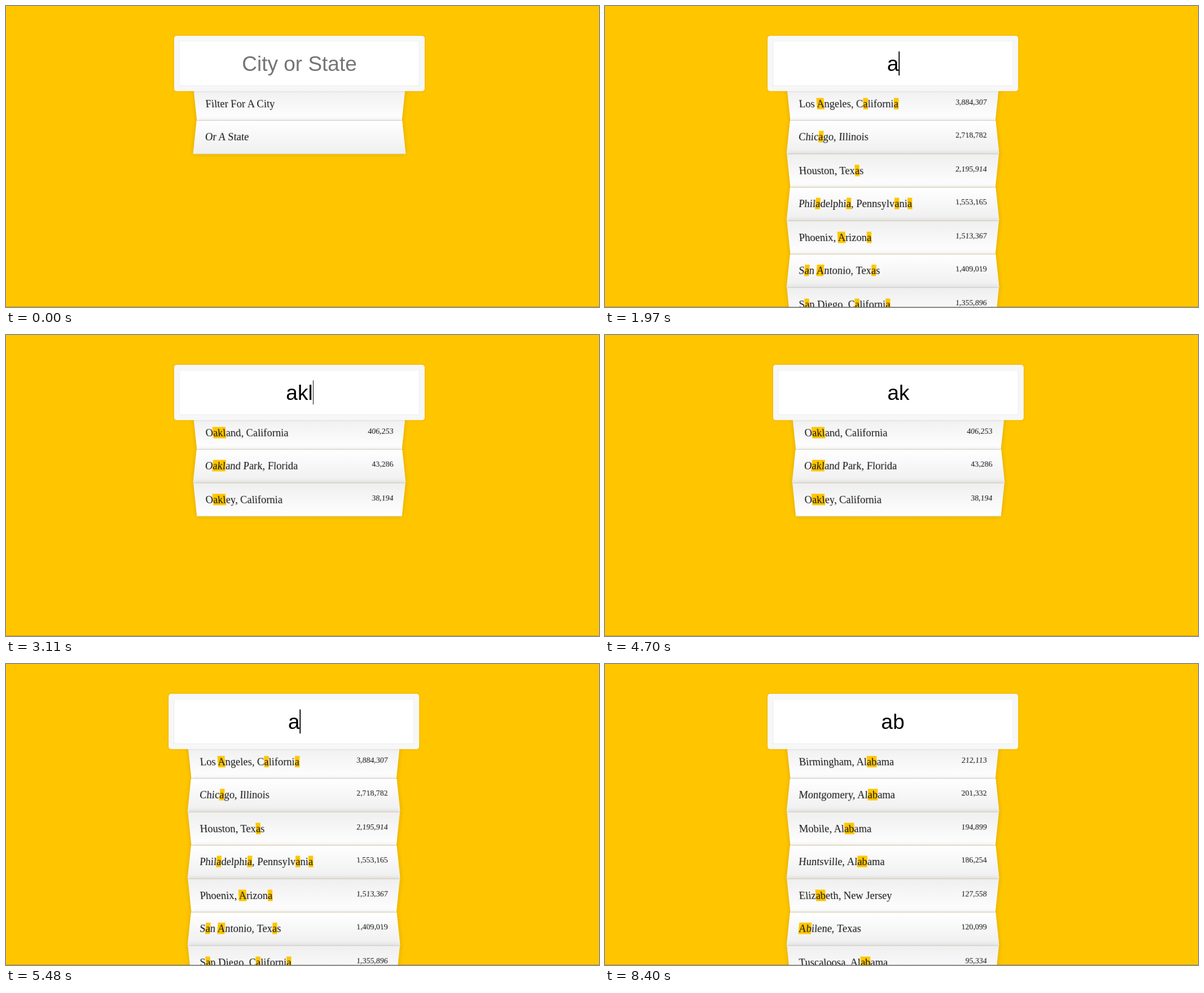
Animation, 1051 px wide and 533 px high, one loop 8600 ms. Source, as an HTML page:

```html
<!DOCTYPE html>
<html lang="en">
<head>
<meta charset="utf-8">
<title>City filter</title>
<style>
  * { box-sizing: border-box; }
  html, body { margin: 0; width: 100%; height: 100%; overflow: hidden; background: #ffc600; }
  #stage { position: relative; width: 1051px; height: 533px; overflow: hidden; background: #ffc600; }
  #stage::after {
    content: ""; position: absolute; left: 0; right: 0; bottom: 0; height: 1px;
    background: rgba(70, 50, 0, .28);
  }
  #form {
    position: absolute; left: 0; top: 0; width: 400px; height: 0;
    transform-origin: 0 0;
  }
  #field {
    position: absolute; z-index: 2; left: -40px; top: 57.3px; width: 480px; height: 106px;
    padding: 20px; border: 10px solid #f7f7f7; border-radius: 5px; background: #fff;
    box-shadow: 0 0 5px rgba(0, 0, 0, .12), inset 0 0 2px rgba(0, 0, 0, .19);
    font: 40px/46px "Liberation Sans", Arial, sans-serif;
    text-align: center; color: #000; white-space: pre;
  }
  #hint { position: absolute; left: 0; right: 0; top: 20px; color: #757575; }
  #typed { position: relative; display: inline-block; height: 46px; vertical-align: top; }
  #caret { position: absolute; left: 100%; top: 0; width: 1.6px; height: 46px; background: #000; }
  ul {
    position: absolute; left: 0; top: 153px; width: 400px; margin: 0; padding: 0;
    font: 20px/23px "Liberation Serif", "Times New Roman", serif; color: #111;
  }
  li {
    display: flex; justify-content: space-between; height: 64px; padding: 20px;
    list-style: none; white-space: pre; border-bottom: 1px solid #d8d8d8;
    box-shadow: 0 0 10px rgba(0, 0, 0, .14);
  }
  li:nth-child(odd) {
    transform: perspective(100px) rotateX(-3deg) translateY(3px);
    background: linear-gradient(to top, #fff, #efefef);
  }
  li:nth-child(even) {
    transform: perspective(100px) rotateX(3deg) translateY(2px) scale(1.001);
    background: linear-gradient(to bottom, #fff, #efefef);
  }
  .count { font-size: 15px; line-height: 17px; }
  mark { background: #ffc600; color: inherit; }
  #pointer { position: absolute; left: 0; top: 0; width: 24px; height: 36px; overflow: visible; }
</style>
</head>
<body>
<div id="stage">
  <div id="form">
    <div id="field"><span id="hint">City or State</span><span id="typed"><span id="text"></span><span id="caret"></span></span></div>
    <ul id="list"></ul>
  </div>
  <svg id="pointer">
    <path id="arrow" d="M.5 .5V18.5L4.8 14.6L8 22L11 20.7L7.9 13.6H14Z" fill="#fff" stroke="#000"/>
    <path id="beam" d="M1 1H5L7 3L9 1H13M7 3V25M1 27H5L7 25L9 27H13" fill="none" stroke="#000" stroke-width="1.2"/>
  </svg>
</div>
<script>
const LOOP = 8600, SCALE = 0.925;
const $ = id => document.getElementById(id);

// Each list: stage centre, matched letters, rows of "name|population".
const lists = {
  start: { mid: 520, match: '', rows: ['Filter For A City|', 'Or A State|'] },
  a: { mid: 510.2, match: 'a', rows: [
    'Los Angeles, California|3,884,307', 'Chicago, Illinois|2,718,782',
    'Houston, Texas|2,195,914', 'Philadelphia, Pennsylvania|1,553,165',
    'Phoenix, Arizona|1,513,367', 'San Antonio, Texas|1,409,019',
    'San Diego, California|1,355,896'] },
  ak: { mid: 510.2, match: 'ak', rows: [
    'Oakland, California|406,253', 'Bakersfield, California|363,630',
    'Akron, Ohio|198,100', 'Salt Lake City, Utah|191,180',
    'Sioux Falls, South Dakota|164,676', 'Lakewood, Colorado|147,214',
    'Thousand Oaks, California|128,731'] },
  akl: { mid: 520, match: 'akl', rows: [
    'Oakland, California|406,253', 'Oakland Park, Florida|43,286',
    'Oakley, California|38,194'] },
  ab: { mid: 510.2, match: 'ab', rows: [
    'Birmingham, Alabama|212,113', 'Montgomery, Alabama|201,332',
    'Mobile, Alabama|194,899', 'Huntsville, Alabama|186,254',
    'Elizabeth, New Jersey|127,558', 'Abilene, Texas|120,099',
    'Tuscaloosa, Alabama|95,334'] }
};

// time, typed text, caret, list
const steps = [
  [0, '', 0, 'start'], [630, '', 1, 'start'], [1180, '', 0, 'start'],
  [1710, 'a', 1, 'start'], [1970, 'a', 1, 'a'], [2240, 'a', 0, 'a'],
  [2500, 'ak', 1, 'a'], [2630, 'ak', 1, 'ak'],
  [2960, 'akl', 1, 'ak'], [3110, 'akl', 1, 'akl'], [3500, 'akl', 0, 'akl'],
  [3960, 'akl', 1, 'akl'], [4040, 'ak', 1, 'akl'], [4570, 'ak', 0, 'akl'],
  [4830, 'ak', 0, 'ak'], [5090, 'a', 1, 'ak'], [5480, 'a', 1, 'a'],
  [5610, 'a', 0, 'a'], [6010, 'ab', 1, 'a'], [6080, 'ab', 1, 'ab'],
  [6540, 'ab', 0, 'ab'], [7070, 'ab', 1, 'ab'], [7550, 'ab', 0, 'ab'],
  [8080, 'ab', 1, 'ab'], [8400, 'ab', 0, 'ab']
];

// time, shape, x, y
const moves = [
  [0, ''], [110, 'arrow', 766, 258], [175, 'beam', 640, 126], [240, 'beam', 543, 73],
  [440, 'beam', 541, 80], [535, 'beam', 536, 87], [630, 'beam', 531, 88],
  [770, 'beam', 610, 92], [860, 'arrow', 790, 112], [950, 'arrow', 990, 140], [1040, '']
];
// The pointer returns from the right and leaves at the bottom.
for (let i = 0; i < 8; i++) {
  moves.push([7617 + i * 67, 'arrow', 1015 - 9 * i, 300 + 4.6 * i * i]);
}
moves.push([8150, '']);

const at = (table, t) => table.findLast(row => row[0] <= t);

function rowHtml(row, match) {
  const [name, count] = row.split('|');
  const label = match ? name.replace(new RegExp(match, 'gi'), '<mark>$&</mark>') : name;
  return `<li><span>${label}</span><span class="count">${count}</span></li>`;
}

let shown;
function showList(key) {
  if (key === shown) return;
  shown = key;
  const { mid, match, rows } = lists[key];
  $('list').innerHTML = rows.map(row => rowHtml(row, match)).join('');
  $('form').style.transform = `translateX(${mid - 200 * SCALE}px) scale(${SCALE})`;
}

function draw(t) {
  const [, text, caret, key] = at(steps, t);
  showList(key);
  $('text').textContent = text;
  $('hint').style.display = text ? 'none' : '';
  $('caret').style.display = caret ? '' : 'none';

  const [, shape, x = 0, y = 0] = at(moves, t);
  $('pointer').style.transform = `translate(${x}px, ${y}px)`;
  for (const id of ['arrow', 'beam']) $(id).style.display = id === shape ? '' : 'none';
}

const begin = performance.now();
function tick() {
  draw((performance.now() - begin) % LOOP);
  requestAnimationFrame(tick);
}
tick();
</script>
</body>
</html>
```
